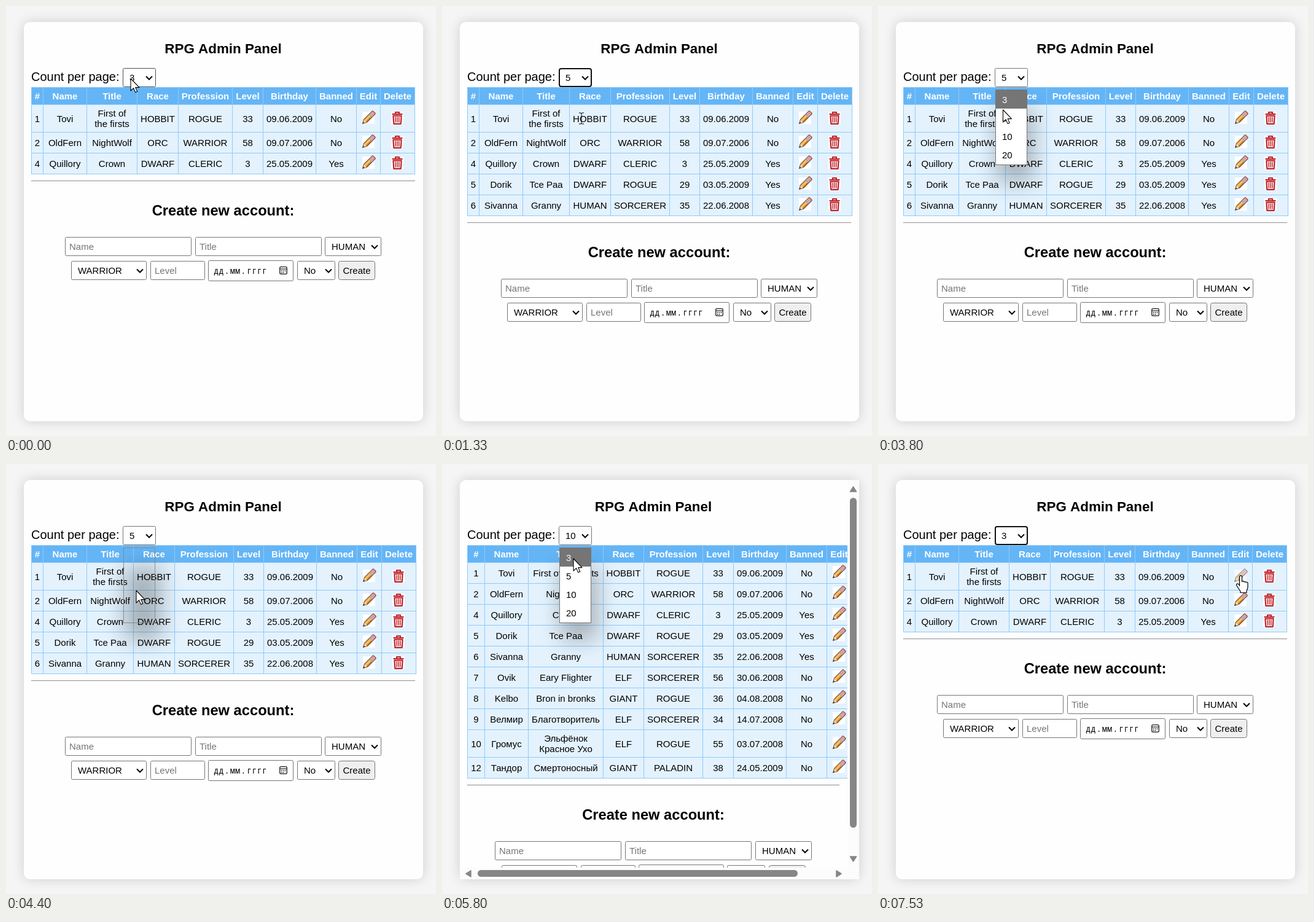
Animation of 700x700 px, one loop 8000 ms. Source, as an HTML page:

```html
<!DOCTYPE html>
<html lang="en">
<head>
<meta charset="utf-8">
<title>RPG Admin Panel</title>
<style>
html, body { margin: 0; width: 100%; height: 100%; overflow: hidden; background: #f5f5f5; }
.card { position: absolute; left: 29px; top: 26px; width: 650px; height: 650px; background: #fefefe;
  border-radius: 10px; box-shadow: 0 0 20px rgba(0, 0, 0, .16); }
svg { position: absolute; left: 0; top: 0; width: 700px; height: 700px; }
text { font: 15px "Liberation Sans", Arial, sans-serif; white-space: pre; }
.head { font-weight: bold; fill: #fff; }
.h1 { font-weight: bold; font-size: 22.4px; font-kerning: none; }
.h2 { font-weight: bold; font-size: 23.7px; font-kerning: none; }
.count { font-size: 20px; }
.hint { fill: #757575; }
.date { font: 13.7px "Noto Sans Mono", "DejaVu Sans Mono", monospace; }
.mid { text-anchor: middle; }
</style>
</head>
<body>
<div class="card"></div>
<svg id="stage" viewBox="0 0 700 700"></svg>
<script>
const HEAD = ['#', 'Name', 'Title', 'Race', 'Profession', 'Level', 'Birthday', 'Banned', 'Edit', 'Delete'];
const ROWS = `1,Tovi,First of|the firsts,HOBBIT,ROGUE,33,09.06.2009,No
2,OldFern,NightWolf,ORC,WARRIOR,58,09.07.2006,No
4,Quillory,Crown,DWARF,CLERIC,3,25.05.2009,Yes
5,Dorik,Tce Paa,DWARF,ROGUE,29,03.05.2009,Yes
6,Sivanna,Granny,HUMAN,SORCERER,35,22.06.2008,Yes
7,Ovik,Eary Flighter,ELF,SORCERER,56,30.06.2008,No
8,Kelbo,Bron in bronks,GIANT,ROGUE,36,04.08.2008,No
9,Велмир,Благотворитель,ELF,SORCERER,34,14.07.2008,No
10,Громус,Эльфёнок|Красное Ухо,ELF,ROGUE,55,03.07.2008,No
12,Тандор,Смертоносный,GIANT,PALADIN,38,24.05.2009,No`.split('\n').map(r => r.split(','));

// widths of the columns that depend on content, the row that wraps, shift of centred content
const VIEWS = {
  3: { num: 19, title: 82.1, prof: 88, wrap: 0, dx: 0 },
  5: { num: 19, title: 76, prof: 95.9, wrap: 0, dx: 0 },
  10: { num: 28, title: 121.8, prof: 95.9, wrap: 8, dx: -9.5 }
};
const OPTIONS = [3, 5, 10, 20];

const rect = (x, y, w, h, fill, more = '') =>
  `<rect x="${x}" y="${y}" width="${w}" height="${h}" fill="${fill}" ${more}/>`;
const text = (x, y, s, cls = '') => `<text x="${x}" y="${y}" class="${cls}">${s}</text>`;
const box = (x, y, w, h, fill = '#fff', r = 2) =>
  rect(x + .5, y + .5, w - 1, h - 1, fill, `rx="${r}" stroke="#767676"`);
const chevron = (x, y) =>
  `<path d="M${x - 5} ${y - 2.5}l5 5 5-5" fill="none" stroke="#000" stroke-width="2"/>`;
const use = (id, x, y) => `<use href="#${id}" x="${x}" y="${y}"/>`;

const select = (x, y, w, label) =>
  box(x, y, w, 31) + text(x + 11, y + 21, label) + chevron(x + w - 11, y + 16);
const input = (x, y, w, hint) => box(x, y, w, 31) + text(x + 7, y + 21, hint, 'hint');

function dateField(x, y) {
  let pen = x + 8, out = box(x, y, 139, 34);
  for (const s of ['дд', '.', 'мм', '.', 'гггг']) {
    const pad = s === '.' ? 0 : 1;
    out += text(pen + pad, y + 22, s, 'date');
    pen += 8.25 * s.length + 2 * pad;
  }
  out += rect(x + 116.7, y + 10.7, 11.6, 11.6, 'none', 'rx="2" stroke="#222" stroke-width="1.3"') +
    rect(x + 117, y + 13.5, 11, 1.2, '#222');
  for (let i = 0; i < 5; i++)
    out += rect(x + 118.7 + i % 3 * 3, y + 16.2 + (i > 2 ? 3 : 0), 1.6, 1.6, '#222');
  return out;
}

function columns({ num, title, prof }) {
  let x = 41;
  return [0, num, 71, title, 66.6, prof, 49.9, 86, 66, 39.45, 56].map(w => Math.round(x += w));
}

function table(view, n) {
  const cols = columns(view), left = cols[0], width = cols[10] - left + 1;
  const mid = i => (cols[i] + cols[i + 1] + 1) / 2;
  let y = 132, fills = '', lines = '', cells = '';
  for (let i = 0; i <= n; i++) {
    const wraps = i - 1 === view.wrap, h = i ? (wraps ? 45 : 34) : 28;
    const cy = y + (h + 1) / 2, base = Math.round(cy + 5.5);
    fills += rect(left, y, width, h + 1, i ? '#e3f2fd' : '#64b5f6');
    lines += rect(left, y, width, 1, '#90caf9');
    (i ? ROWS[i - 1] : HEAD).forEach((s, c) => {
      if (wraps && s.includes('|'))
        s.split('|').forEach((part, k) => cells += text(mid(c), cy - 3 + 17 * k, part, 'mid'));
      else cells += text(mid(c), base, s.replace('|', ' '), i ? 'mid' : 'head mid');
    });
    if (i) {
      const top = Math.floor(cy - 11);
      cells += `<g class="edit">${use('pencil', Math.floor(mid(8) - 10), top)}</g>` +
        use('trash', Math.floor(mid(9) - 10), top);
    }
    y += h;
  }
  lines += rect(left, y, width, 1, '#90caf9');
  cols.forEach(x => lines += rect(x, 132, 1, y - 131, '#90caf9'));
  return { svg: fills + lines + cells, end: y };
}

function page(n) {
  const view = VIEWS[n], { dx } = view, { svg, end } = table(view, n);
  const hr = end + 11, cx = 353.5 + dx, y1 = hr + 92, y2 = hr + 131;
  const at = x => Math.round(x + dx);
  const span = 625 + 2 * dx;
  return text(cx, 77, 'RPG Admin Panel', 'h1 mid') + text(41, 122, 'Count per page:', 'count') + svg +
    rect(41, hr, span, 1, '#9a9a9a') + rect(41, hr + 1, span, 1, '#eee') +
    text(cx, hr + 57, 'Create new account:', 'h2 mid') +
    input(at(95.6), y1, 206, 'Name') + input(at(307.6), y1, 206, 'Title') +
    select(at(519.2), y1, 92, 'HUMAN') + select(at(106.2), y2, 123, 'WARRIOR') +
    input(at(235.2), y2, 89, 'Level') + dateField(at(329.2), y2 - 1) +
    select(at(473.7), y2, 62, 'No') +
    box(at(541.2), y2, 60, 31, '#efefef', 3) + text(at(541.2) + 30, y2 + 21, 'Create', 'mid');
}

const scrollbars = rect(660, 26, 19, 650, '#fcfcfc') + rect(29, 657, 650, 19, '#fcfcfc') +
  rect(664, 55, 11, 537, '#868686', 'rx="5.5"') + rect(58, 661, 521, 11, '#868686', 'rx="5.5"') +
  `<path d="M669.5 37l5 8h-10zM669.5 647l5-8h-10zM39 667l8-5v10zM650 667l-8-5v10z"
    fill="#868686" stroke="#868686" stroke-width="1.5" stroke-linejoin="round"/>`;

const defs = `<defs>
  <clipPath id="port"><rect x="29" y="26" width="631" height="631"/></clipPath>
  <filter id="soft" x="-200%" y="-100%" width="500%" height="300%"><feGaussianBlur stdDeviation="18"/></filter>
  <g id="pencil"><rect width="20" height="20" fill="#fff"/>
    <g transform="translate(.6 19.4) rotate(-45)">
      <path d="M0 0L6-3.5V3.5z" fill="#f2d8ae"/><path d="M0 0L2.8-1.6V1.6z" fill="#333"/>
      <rect x="6" y="-3.5" width="11" height="7" fill="#f0a23a"/>
      <rect x="6" y="-1.5" width="11" height="2" fill="#f9c76d"/>
      <rect x="6" y="1.5" width="11" height="2" fill="#c9781f"/>
      <rect x="17" y="-3.5" width="3" height="7" fill="#a9abb5"/>
      <rect x="20" y="-3.5" width="6.4" height="7" rx="1.6" fill="#e79a9a"/>
      <path d="M0 0L6-3.5H25q1.4 0 1.4 1.4V2.1q0 1.4-1.4 1.4H6z" fill="none" stroke="#5a4136"/>
    </g></g>
  <g id="trash"><rect width="20" height="20" fill="#fff"/>
    <g fill="none" stroke="#c0242a" stroke-width="2.2">
      <path d="M1.5 4H18.5M7 3.5V1H13V3.5M3.4 6.6L4.3 19.8H15.7L16.6 6.6z" stroke-linejoin="round"/>
      <path d="M7.2 8.5V17.5M10 8.5V17.5M12.8 8.5V17.5" stroke-width="1.5"/></g></g>
</defs>`;

const popup = `<g id="shade">${rect(194, 168, 58, 118, '#000', 'opacity=".27" filter="url(#soft)"')}
    ${rect(191.5, 136.5, 51, 122, 'none', 'stroke="#858b90"')}</g>
  <g id="list">${rect(191.5, 136.5, 51, 122, '#fff', 'stroke="#767676"')}
    <rect id="mark" x="192" width="50" height="30" fill="#757575"/>
    ${OPTIONS.map((s, i) => text(202, 158 + 30 * i, s, 'opt')).join('')}</g>`;

const cursors = `<g id="cursor" stroke="#000" stroke-linejoin="round">
  <path id="arrow" d="M0 0V20L4.6 15.6 7.7 22.6 10.7 21.3 7.7 14.6H14z" fill="#fff" stroke-width="1.1"/>
  <path id="beam" d="M-4-9h3l1 1 1-1h3M0-8V8M-4 9h3l1-1 1 1h3" fill="none"/>
  <path id="hand" transform="translate(-7.5 0)" fill="#fff" stroke-width="1.2"
    d="M5.5 17V2.2a2 2 0 0 1 4 0V10a1.9 1.9 0 0 1 3.4.6a1.9 1.9 0 0 1 3.2.8a1.7 1.7 0 0 1 2.9 1.4V19q0 3-2 5.5V28H7V25.5Q5 23 1 16.5q-1-2.2.6-3q1.8-.6 3.9 2.5z"/>
</g>`;

const stage = document.getElementById('stage');
stage.innerHTML = defs +
  [3, 5, 10].map(n => `<g id="page${n}"><g ${n === 10 ? 'clip-path="url(#port)"' : ''}>${page(n)}</g>` +
    `${n === 10 ? scrollbars : ''}</g>`).join('') +
  '<rect id="frame" fill="#fff"/><text id="value" x="201" y="122"></text>' + chevron(233, 117) + popup + cursors;

const $ = id => document.getElementById(id);
const show = (id, on) => $(id).style.display = on ? '' : 'none';
const set = (id, attrs) => { for (const k in attrs) $(id).setAttribute(k, attrs[k]); };

// each use of the list, in ticks: shadow appears, list opens, list closes, new page size applies
const PICKS = [
  { rows: 3, open: 1, full: 2, pick: 16, done: 17 },
  { rows: 5, open: 32, full: 33, pick: 66, done: 67 },
  { rows: 10, open: 80, full: 80, pick: 92, done: 92 }
];
// pointer moves: first tick, last tick, end point
const HOME = [203, 118];
const MOVES = [
  [6, 11, 228, 180], [16, 20, 227, 183], [21, 29, 208, 118], [36, 39, 203, 152],
  [56, 57, 203.5, 169], [57, 60, 212, 206], [67, 76, 214, 119], [81, 87, 214, 154],
  [100, 106, 590, 246], [106, 109, 588, 200], [111, 113, 590.5, 181.5]
];
const TICK = 1000 / 15, LOOP = 8000;

function pointer(tick) {
  let [x, y] = HOME;
  for (const [from, to, tx, ty] of MOVES) {
    const p = Math.min(1, Math.max(0, (tick - from) / (to - from)));
    x += (tx - x) * p;
    y += (ty - y) * p;
  }
  return [x, y];
}

function draw(ms) {
  const tick = Math.floor(((ms + 5) % LOOP) / TICK);
  const now = PICKS.find(p => tick < p.done);
  const rows = now ? now.rows : 3;
  const open = now && tick >= now.open;
  const full = open && tick >= now.full && tick < now.pick;
  const ring = !open && now !== PICKS[0];
  const [x, y] = pointer(tick);

  [3, 5, 10].forEach(n => show('page' + n, n === rows));
  set('frame', ring
    ? { x: 191, y: 102, width: 52, height: 29, rx: 3, stroke: '#101010', 'stroke-width': 2 }
    : { x: 190.5, y: 101.5, width: 53, height: 30, rx: 2, stroke: open ? '#767676' : '#4f4f4f', 'stroke-width': 1 });
  $('value').textContent = rows;

  // the highlight trails the pointer by one tick
  const hoverY = pointer(tick - 1)[1];
  const mark = hoverY < 137 ? OPTIONS.indexOf(rows) : Math.floor((hoverY - 137) / 30);
  show('shade', open);
  show('list', full);
  set('mark', { y: 137 + 30 * mark });
  document.querySelectorAll('.opt').forEach((o, i) => o.setAttribute('fill', i === mark ? '#fff' : '#000'));

  const hand = tick >= 112, beam = rows === 5 && !open && y > 134;
  set('cursor', { transform: `translate(${x} ${y})` });
  show('hand', hand);
  show('beam', beam);
  show('arrow', !hand && !beam);
  document.querySelector('#page3 .edit').style.opacity = hand ? .6 : 1;
}

const start = performance.now();
function loop() {
  draw(performance.now() - start);
  requestAnimationFrame(loop);
}
loop();
</script>
</body>
</html>
```
